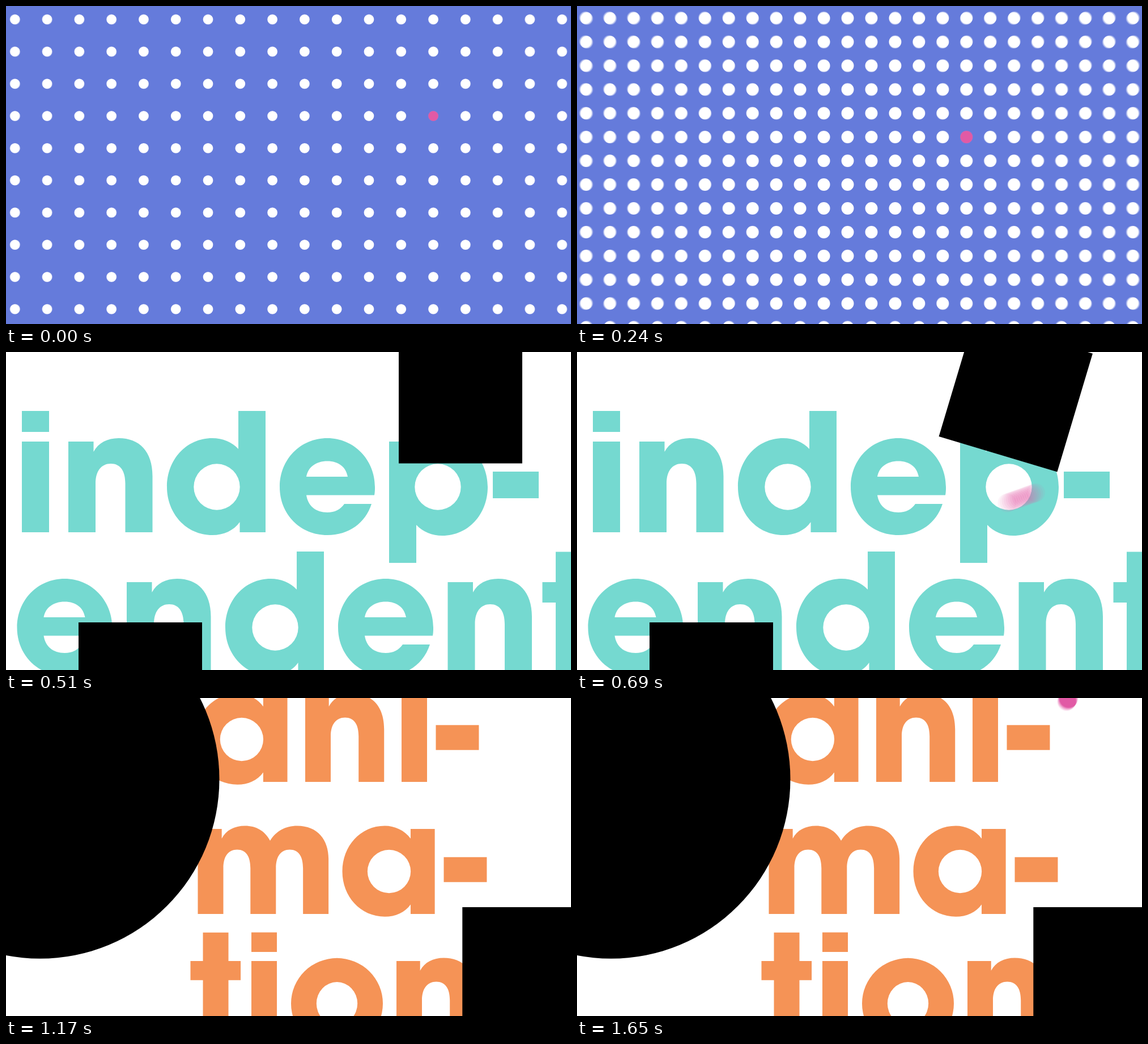
Recreate the animation shown at these times as an HTML page with a canvas. Size 997x561 px, loop 1680 ms.

```html
<!DOCTYPE html>
<html lang="en">
<head>
<meta charset="utf-8">
<title>independent animation</title>
<style>
  html, body { margin: 0; width: 100%; height: 100%; overflow: hidden; background: #fff; }
  canvas { display: block; }
</style>
</head>
<body>
<canvas id="stage" width="997" height="561" role="img" aria-label="independent animation"></canvas>
<script>
const W = 997, H = 561, LOOP = 1680, STEP = 30;
const BLUE = '#657bdb', TEAL = '#75d9d0', ORANGE = '#f59356', PINK = '#e85a9e';
const SHUTTER = 11, SAMPLES = 15;

const ctx = document.getElementById('stage').getContext('2d');
const layer = document.createElement('canvas');
layer.width = W;
layer.height = H;
const lctx = layer.getContext('2d');

// Letterforms: baseline at y = 0, flat x-height at y = -160
const STEM = 'M0,0V-160H48V0Z';
const BOWL = 'V0H128.5V-18C118,-3 100,5 80,5C34,5 0,-33 0,-80C0,-128 34,-166 80,-166';
const ring = (cx, rx, ry) =>
  `M${cx - rx},-80a${rx},${ry} 0 1 0 ${2 * rx},0a${rx},${ry} 0 1 0 ${-2 * rx},0Z`;
const EYE = ring(88, 40.7, 40.7);
const shapes = {
  i: STEM + 'M0,-214H48V-177H0Z',
  n: 'M0,0V-160H44.5V-142C53,-158 69,-166 89,-166C125,-166 148.5,-143 148.5,-99V0H100.5V-86' +
     'C100.5,-108 92,-121 75,-121C58,-121 48,-108 48,-86V0Z',
  m: 'M0,0V-160H45V-142C53,-158 69,-166 89,-166C109,-166 126,-157 136,-138' +
     'C147,-156 165,-166 187,-166C226,-166 246,-139 246,-104V0H198V-86' +
     'C198,-108 190,-121 173,-121C156,-121 147,-108 147,-86V0H99V-86' +
     'C99,-108 91,-121 74,-121C57,-121 48,-108 48,-86V0Z',
  d: `M174,-214${BOWL}C98,-166 115,-159 126,-147V-214Z${EYE}`,
  a: `M174,-160${BOWL}C98,-166 117,-158 128.5,-142V-160Z${EYE}`,
  e: 'M167,-65.5C168,-71 168,-76 168,-80C168,-128 131,-166 84,-166C36,-166 0,-128 0,-80' +
     'C0,-32 36,5 84,5C122,5 151,-16 162,-50H114C107,-40 97,-35 84,-35C64,-35 50,-46 47,-65.5Z' +
     'M47,-98C50,-115 64,-125.5 84,-125.5C104,-125.5 117,-115 120,-98Z',
  o: ring(86.4, 86.4, 85.5) + ring(86.4, 38.6, 40.5),
  t: 'M23.5,0V-124H0V-160H23.5V-213.5H71.5V-160H94.5V-124H71.5V0Z',
  '-': 'M0,-107H81V-60H0Z'
};
const glyphs = {};
for (const key in shapes) glyphs[key] = new Path2D(shapes[key]);
// p is d turned half a circle
glyphs.p = new Path2D();
glyphs.p.addPath(glyphs.d, new DOMMatrix([-1, 0, 0, -1, 174, -160]));

function write(word, xs, baseline, scale, color) {
  ctx.fillStyle = color;
  xs.forEach((x, i) => {
    ctx.save();
    ctx.translate(x, baseline);
    ctx.scale(scale, scale);
    ctx.fill(glyphs[word[i]], 'evenodd');
    ctx.restore();
  });
}

function clear(color) {
  ctx.fillStyle = color;
  ctx.fillRect(0, 0, W, H);
}

function square(cx, cy, turn) {
  ctx.save();
  ctx.translate(cx, cy);
  ctx.rotate(turn);
  ctx.fillStyle = '#000';
  ctx.fillRect(-109, -109, 218, 218);
  ctx.restore();
}

// Average of several moments inside the shutter time
function blurred(t, paint) {
  lctx.clearRect(0, 0, W, H);
  lctx.globalCompositeOperation = 'lighter';
  lctx.globalAlpha = 1 / SAMPLES;
  for (let k = 0; k < SAMPLES; k++) paint(t + (k / (SAMPLES - 1) - 0.5) * SHUTTER);
  ctx.drawImage(layer, 0, 0);
}

function addDot(x, y, r) {
  lctx.moveTo(x + r, y);
  lctx.arc(x, y, r, 0, 2 * Math.PI);
}

function paintDots(t) {
  const gap = 40.7 + 16.8 / (1 + Math.exp((t - 132.7) / 42.5));
  const r = 8.85 + 0.0117 * t - 0.0000125 * t * t;
  const at = (i, j) => [498.5 + (i + 0.5) * gap, 336 + (j + 0.5) * gap, r];
  lctx.fillStyle = '#fff';
  lctx.beginPath();
  for (let j = -10; j < 7; j++)
    for (let i = -14; i < 14; i++)
      if (i !== 4 || j !== -3) addDot(...at(i, j));
  lctx.fill();
  lctx.fillStyle = PINK;
  lctx.beginPath();
  addDot(...at(4, -3));
  lctx.fill();
}

const mix = (a, b, u) => a + (b - a) * u;

function ball(t, path) {
  blurred(t, time => {
    const [x, y] = path(time);
    lctx.fillStyle = PINK;
    lctx.beginPath();
    addDot(x, y, 16.5);
    lctx.fill();
  });
}

// In from the right, off the square's corner, out at lower left
function ricochet(t) {
  if (t < 660) {
    const u = (t - 630) / 30;
    return [mix(994, 922, u), mix(168, 208, u)];
  }
  const u = (t - 660) / 180;
  return [mix(922, 95, u), mix(208, 503, u)];
}

function rise(t) {
  const u = (t - 1470) / 180, f = u * (1.8 - 0.8 * u);
  return [mix(530, 866, f), mix(515, 3, f)];
}

function gridScene(t) {
  clear(BLUE);
  blurred(t, paintDots);
}

function firstWord(t) {
  clear('#fff');
  write('indep-', [28, 110, 284, 483, 676, 859], 318, 1, TEAL);
  write('endent', [19.5, 213, 387, 586, 779.5, 946.5], 566, 1, TEAL);
  square(237, 586, 0);
  const u = Math.min(1, Math.max(0, (t - 660) / 210));
  const f = 1 - (1 - u) ** 3;
  square(mix(802, 727, f), mix(87.5, 56, f), f * Math.PI / 4);
  if (t >= 630 && t < 870) ball(t, ricochet);
}

function secondWord(t) {
  const scale = 0.9375;
  clear('#fff');
  write('ani-', [333.4, 528, 698, 758.5], 148, scale, ORANGE);
  write('ma-', [338.5, 593.5, 772.5], 381, scale, ORANGE);
  write('tion', [325.5, 433, 503, 689], 614, scale, ORANGE);
  ctx.fillStyle = '#000';
  ctx.beginPath();
  ctx.arc(60, 143.3, 316.5, 0, 2 * Math.PI);
  ctx.fill();
  square(914.3, 478, 0);
  if (t >= 1470) ball(t, rise);
}

const start = performance.now();
let shown = -1;

function tick() {
  const elapsed = (performance.now() - start) % LOOP;
  const t = Math.floor(elapsed / STEP) * STEP;
  if (t !== shown) {
    shown = t;
    (t < 510 ? gridScene : t < 1170 ? firstWord : secondWord)(t);
  }
  requestAnimationFrame(tick);
}
tick();
</script>
</body>
</html>
```
